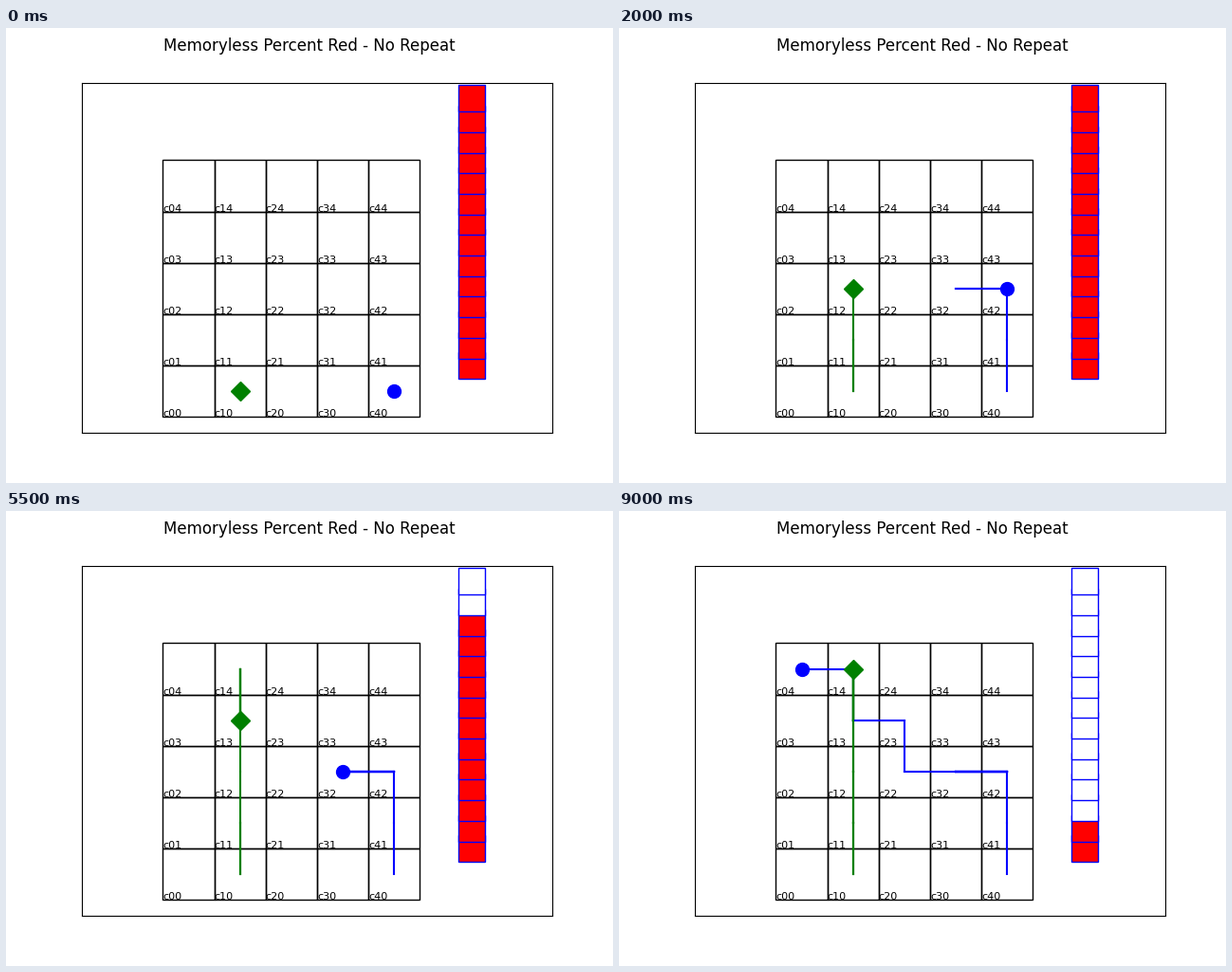
A matplotlib script for the animation above (9.5 s loop, 640 by 480 pixels).

```python
import matplotlib.pyplot as plt
from matplotlib.animation import FuncAnimation
from matplotlib.patches import Rectangle

SIZE = 5
CELLS = 14

# Cell centres are half a unit in from the lower left corner.
rows = [0, 1, 0, 1, 2, 3, 4, 3, 4, 3, 4, 3, 4, 3, 2, 1, 2, 3, 4]
green_path = [(1, r) for r in rows]
blue_path = ([(4, 0), (4, 1), (4, 2), (3, 2)] + [(4, 2)] * 3
             + [(3, 2), (4, 2)] * 3
             + [(3, 2), (2, 2), (2, 3), (1, 3), (1, 4), (0, 4)])
STEPS = len(rows)


def spent_cells(step):
    """Number of emptied gauge cells."""
    if step > 13:
        return 2 * (step - 12)
    if blue_path[step] in [(4, 1), (3, 2)]:
        return 2
    return 0


fig, ax = plt.subplots(figsize=(6.4, 4.8), dpi=100)
fig.suptitle("Memoryless Percent Red - No Repeat", fontsize=12)
ax.set(xticks=[], yticks=[], ylim=(-0.31, 6.51))
half = 6.82 * 496 / 369.6 / 2
ax.set_xlim(3 - half, 3 + half)

for x in range(SIZE):
    for y in range(SIZE):
        ax.add_patch(Rectangle((x, y), 1, 1, fill=False, ec="black", lw=1))
        ax.text(x, y, f"c{x}{y}", fontsize=8)

gauge = [ax.plot(6, 1 + 0.4 * i, "s", ms=20, mfc="red", mec="blue")[0]
         for i in range(CELLS)]


def segment(path, step, color):
    (x0, y0), (x1, y1) = path[step - 1], path[step]
    return ax.plot([x0 + 0.5, x1 + 0.5], [y0 + 0.5, y1 + 0.5],
                   color=color, lw=1.5)[0]


trails = [(segment(blue_path, s, "blue"), segment(green_path, s, "green"))
          for s in range(1, STEPS)]
blue_dot, = ax.plot([], [], "o", color="blue", ms=10, zorder=2.5)
green_dot, = ax.plot([], [], "D", color="green", ms=10, zorder=2.5)


def place(dot, cell):
    dot.set_data([cell[0] + 0.5], [cell[1] + 0.5])


def draw(step):
    for s, pair in enumerate(trails, 1):
        for line in pair:
            line.set_visible(s <= step)
    place(blue_dot, blue_path[step])
    place(green_dot, green_path[step])
    full = CELLS - spent_cells(step)
    for i, cell in enumerate(gauge):
        cell.set_markerfacecolor("red" if i < full else "white")
    return []


anim = FuncAnimation(fig, draw, frames=STEPS, interval=500,
                     init_func=lambda: draw(0), repeat=True, repeat_delay=0)
plt.show()
```
